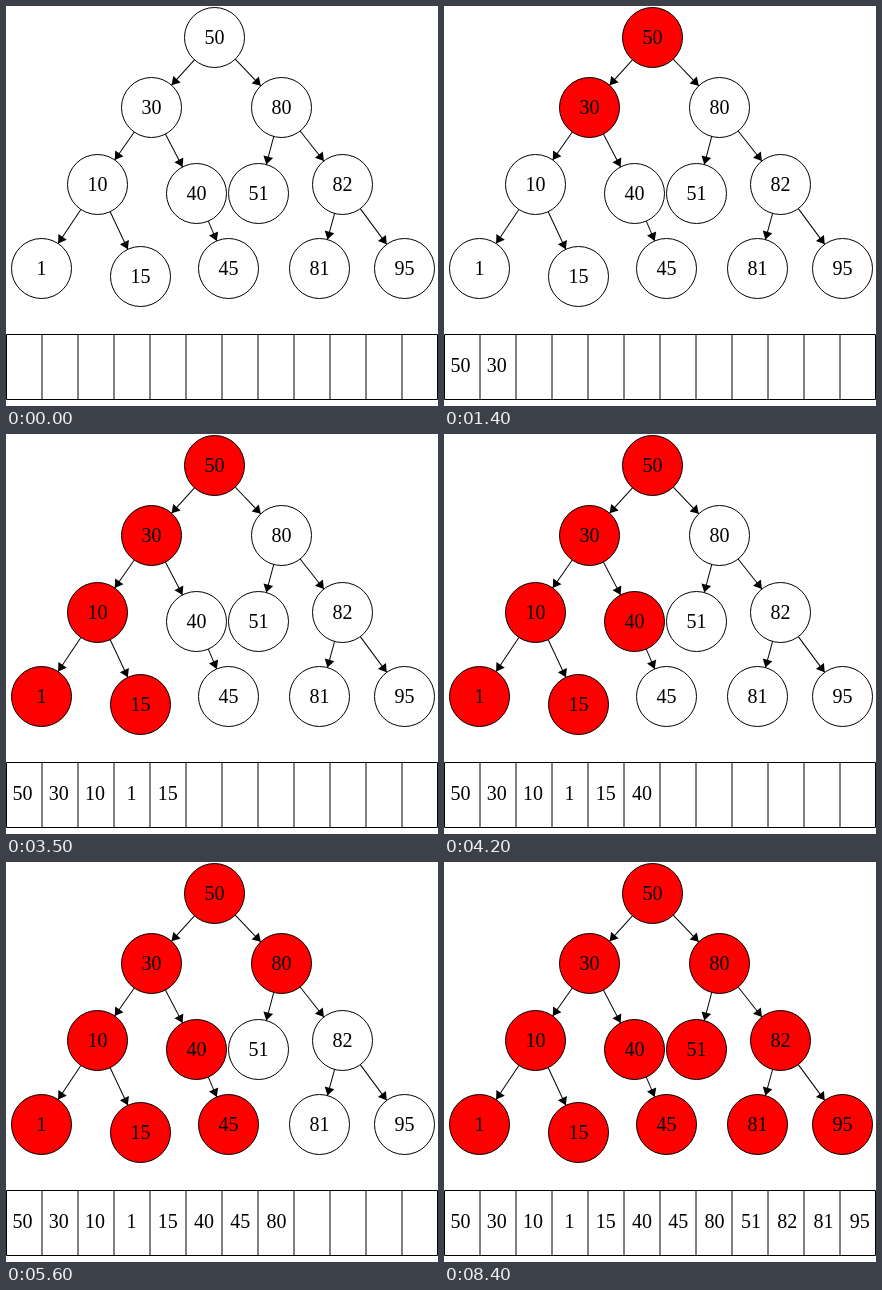
Write an HTML page that moves like this. It is 432x400 px and loops after 9.1 s.

```html
<!DOCTYPE html>
<html lang="en">
<head>
<meta charset="utf-8">
<title>Preorder traversal</title>
<style>
  @property --step { syntax: "<number>"; inherits: true; initial-value: 0; }
  html, body { margin: 0; width: 100%; height: 100%; overflow: hidden; background: #fff; }
  svg { display: block; animation: visit 9100ms steps(13, end) infinite; }
  @keyframes visit { from { --step: 0; } to { --step: 13; } }
  text { font: 20px "Liberation Serif", "Times New Roman", serif; text-anchor: middle; }
  .line { fill: none; stroke: #000; stroke-width: 1; }
  .visited { opacity: clamp(0, var(--step) - var(--i), 1); }
  .fill { fill: #f00; }
</style>
</head>
<body>
<svg id="stage" width="432" height="400" viewBox="0 0 432 400"></svg>
<script>
  const R = 30, CELL = 36, TOP = 328.5, BOTTOM = 393.5;

  // Search tree keys with their centres; inserting them in this order gives the links
  const points = [
    [50, 208, 31], [30, 145, 101], [10, 91, 178], [1, 35, 262], [15, 134, 270],
    [40, 190, 187], [45, 222, 262], [80, 275, 101], [51, 252, 187],
    [82, 336, 178], [81, 313, 262], [95, 398, 262]
  ];
  const nodes = points.map(([key, x, y]) => ({ key, x: x + 0.5, y: y + 0.5 }));

  // Adds a node below the root and returns its parent
  function insert(root, node) {
    const side = node.key < root.key ? "left" : "right";
    if (root[side]) return insert(root[side], node);
    root[side] = node;
    return root;
  }

  const circle = ({ x, y }, attrs) => `<circle cx="${x}" cy="${y}" r="${R}" ${attrs}/>`;
  const label = (x, y, key, attrs = "") => `<text x="${x}" y="${y}" ${attrs}>${key}</text>`;

  function arrow(from, to) {
    const dx = to.x - from.x, dy = to.y - from.y;
    const angle = Math.atan2(dy, dx) * 180 / Math.PI;
    const tip = Math.hypot(dx, dy) - R;
    return `<g transform="translate(${from.x} ${from.y}) rotate(${angle})">
      <path class="line" d="M${R} 0H${tip}"/>
      <path d="M${tip} 0l-8 -5v10z"/></g>`;
  }

  const fills = [], edges = [], rings = [], labels = [];
  nodes.forEach((node, i) => {
    const visited = `style="--i:${i}"`;
    fills.push(circle(node, `class="fill visited" ${visited}`));
    if (i) edges.push(arrow(insert(nodes[0], node), node));
    rings.push(circle(node, 'class="line"'));
    labels.push(label(node.x, node.y + 6.5, node.key));
    labels.push(label(16.5 + 36.3 * i, 366, node.key, `class="visited" ${visited}`));
  });

  let grid = `M.5 ${TOP}H431.5V${BOTTOM}H.5z`;
  for (let k = 1; k < nodes.length; k++) grid += `M${k * CELL} ${TOP}V${BOTTOM}`;

  document.getElementById("stage").innerHTML =
    [...fills, ...edges, ...rings, `<path class="line" d="${grid}"/>`, ...labels].join("");
</script>
</body>
</html>
```
